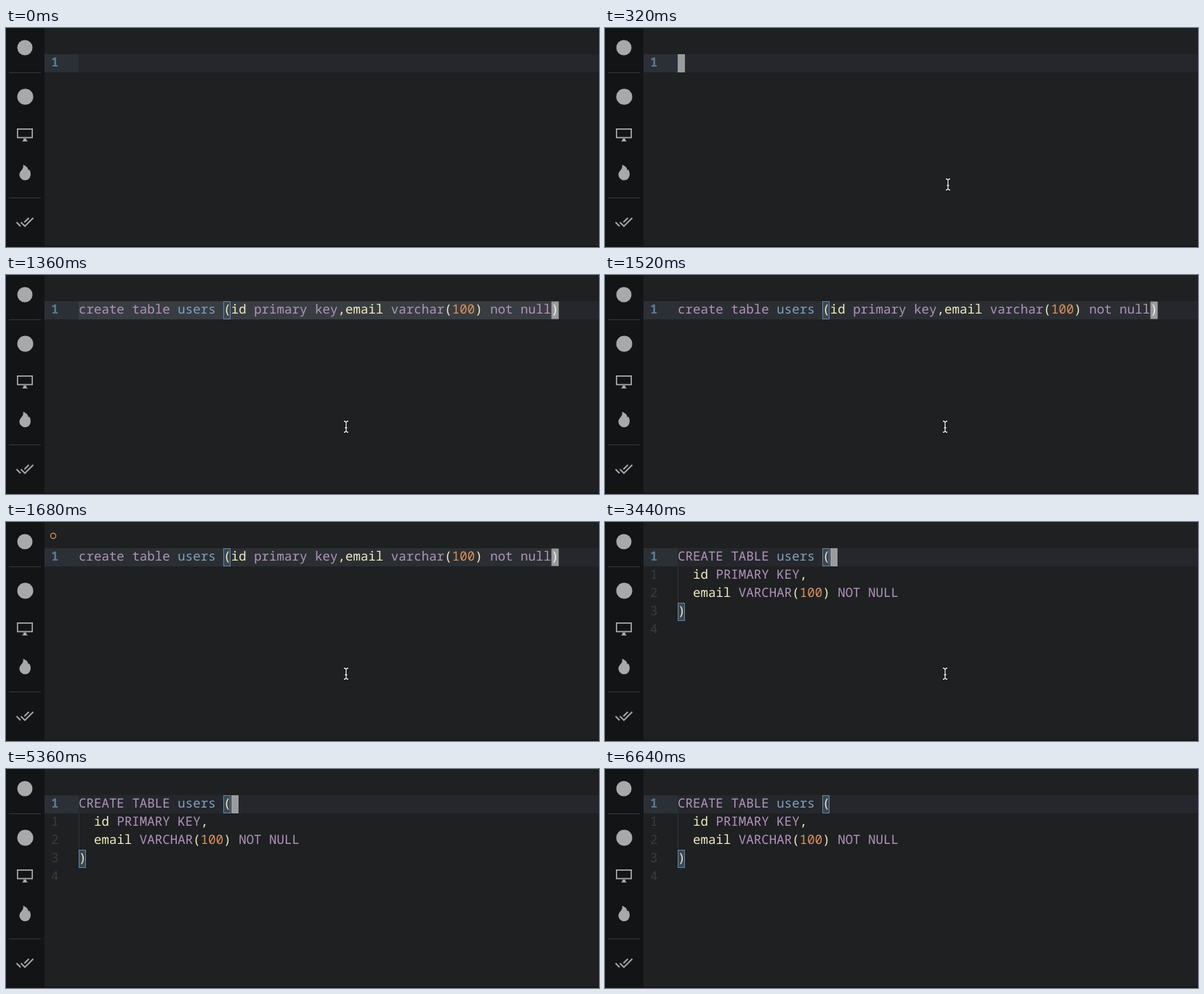
An HTML page that plays this animation: 816 by 301 pixels, repeating every 6.8 s.

```html
<!DOCTYPE html>
<html lang="en">
<head>
<meta charset="utf-8">
<title>SQL formatting</title>
<style>
  html, body { margin: 0; width: 100%; height: 100%; overflow: hidden; background: #1e2022; }
  svg { display: block; width: 816px; height: 301px; }
  text {
    font: 17.47px "Noto Sans Mono", "DejaVu Sans Mono", monospace;
    text-rendering: geometricPrecision;
    white-space: pre;
  }
  .k { fill: #b294bb; }
  .t { fill: #81a2be; }
  .p { fill: #f0ecc0; }
  .n { fill: #de935f; }
  .w { fill: #f2f2ee; }
  .cur { fill: #5b7a8f; font-weight: 600; }
  .dim { fill: #393d41; }
  .match { fill: #3b4650; stroke: #5e86a8; }
  .block { fill: #999b9d; }
</style>
</head>
<body>
<svg viewBox="0 0 816 301">
  <rect width="816" height="301" fill="#1e2022"/>
  <rect x="53" y="36" width="763" height="25" fill="#25272c"/>
  <rect x="53" y="36" width="47" height="25" fill="#2b3036"/>

  <g id="sidebar">
    <rect width="53" height="301" fill="#131416"/>
    <path d="M4 61.5H48M4 233.5H48" stroke="#343638"/>
    <g fill="#a8a9aa">
      <circle cx="26" cy="27" r="10.5"/>
      <circle cx="26.5" cy="94.5" r="11"/>
      <path d="M15 138H37V151.5H15ZM16.7 139.7V149.8H35.3V139.7Z" fill-rule="evenodd"/>
      <path d="M24 152H28V154L30 156H22L24 154Z"/>
      <path d="M23.5 188C29 190 30.5 193 30.7 195.5L32 194.5C34.5 198 34.5 203 32.5 206C30 209.7 25 210.5 21.5 207.5C17.5 204 17.8 199.5 20.5 196.5C23 193.8 24.3 191.5 23.5 188Z"/>
    </g>
    <path d="M14.5 267L20 272.5M20.5 267L26 272.5L37.5 261M25.3 267L31.5 261" fill="none" stroke="#a8a9aa" stroke-width="1.9"/>
  </g>
  <rect y="299.5" width="816" height="1.5" fill="#151316"/>

  <rect id="flash" x="100" y="36" width="661" height="25"/>
  <text class="cur" x="62" y="53">1</text>
  <g id="before"></g>
  <g id="after"></g>
  <rect id="caret" class="block" y="36" width="10" height="25"/>
  <circle id="dot" cx="65" cy="19" r="3.6" fill="none" stroke="#dc9a5c" stroke-width="1.2"/>
  <g id="mouse" fill="none">
    <path id="beam" d="M-3 -7.5H-1.5L0 -6L1.5 -7.5H3M-3 7.5H-1.5L0 6L1.5 7.5H3M0 -6V6M-1.5 1.5H1.5" stroke="#0c0d0e" stroke-width="2.8"/>
    <use href="#beam" id="core"/>
    <path d="M-3 -7.5H-1.5L0 -6L1.5 -7.5H3M-3 7.5H-1.5L0 6L1.5 7.5H3M0 -6V6M-1.5 1.5H1.5" stroke="#f4f4f4" stroke-width="1.3"/>
  </g>
</svg>
<script>
const LOOP = 6800, CELL = 10.485, LEFT = 100, ROW = 25;
const $ = id => document.getElementById(id);

function add(parent, tag, attrs, text = '') {
  const el = document.createElementNS('http://www.w3.org/2000/svg', tag);
  for (const key in attrs) el.setAttribute(key, attrs[key]);
  el.textContent = text;
  parent.append(el);
}

// Tokens are "class:text"; they advance along the character grid.
function line(parent, row, col, ...tokens) {
  for (const token of tokens) {
    const text = token.slice(2);
    add(parent, 'text', { class: token[0], x: LEFT + col * CELL, y: 53 + row * ROW }, text);
    col += text.length;
  }
}

function bracket(parent, row, col) {
  const x = Math.round(LEFT + col * CELL) + .5;
  add(parent, 'rect', { class: 'match', x, y: 36.5 + row * ROW, width: 9, height: 24 });
}

const before = $('before'), after = $('after');

bracket(before, 0, 19);
add(before, 'rect', { class: 'block', x: 750.5, y: 36.5, width: 10, height: 24 });
line(before, 0, 0, 'k:create', 'k: table', 't: users', 'p: (', 'p:id', 'k: primary', 'k: key',
  'p:,', 'p:email', 'k: varchar', 'p:(', 'n:100', 'p:)', 'k: not', 'k: null', 'w:)');

add(after, 'path', { d: 'M100.5 61V111', stroke: '#303438' });
bracket(after, 0, 19);
bracket(after, 3, 0);
line(after, 0, 0, 'k:CREATE', 'k: TABLE', 't: users', 'p: (');
line(after, 1, 2, 'p:id', 'k: PRIMARY', 'k: KEY', 'p:,');
line(after, 2, 2, 'p:email', 'k: VARCHAR', 'p:(', 'n:100', 'p:)', 'k: NOT', 'k: NULL');
line(after, 3, 0, 'p:)');
for (let n = 1; n < 5; n++) add(after, 'text', { class: 'dim', x: 62, y: 53 + n * ROW }, n);

// Each step: start time, value; null hides the part.
const mouseSteps = [
  [0, null], [80, [487, 260]], [160, [482, 243]], [240, [477, 227]],
  [320, [472, 215]], [400, [470, 210]], [480, [469, 208]],
  [800, [468.5, 208]], [1120, [468, 208.5]],
  [5040, [464, 209.5]], [5120, [453, 221]], [5200, [427, 247]],
  [5280, [388, 281]], [5360, null]
];
const flashSteps = [[0, null], [1360, '#383d42'], [1440, '#31363a'], [1520, '#2b2f33'], [3440, null]];
const caretSteps = [[0, null], [80, 100], [1360, null], [3440, 310], [6640, null]];

const at = (steps, t) => steps.findLast(s => s[0] <= t)[1];
const show = (el, on) => el.setAttribute('visibility', on ? 'visible' : 'hidden');

function draw() {
  const t = performance.now() % LOOP;
  const pos = at(mouseSteps, t), flash = at(flashSteps, t), caret = at(caretSteps, t);

  show($('mouse'), pos);
  if (pos) $('mouse').setAttribute('transform', `translate(${pos})`);
  show($('flash'), flash);
  if (flash) $('flash').setAttribute('fill', flash);
  show($('caret'), caret);
  if (caret) $('caret').setAttribute('x', caret);

  show(before, t >= 1360 && t < 3440);
  show(after, t >= 3440);
  show($('dot'), t >= 1680 && t < 3440);
  requestAnimationFrame(draw);
}
draw();
</script>
</body>
</html>
```
